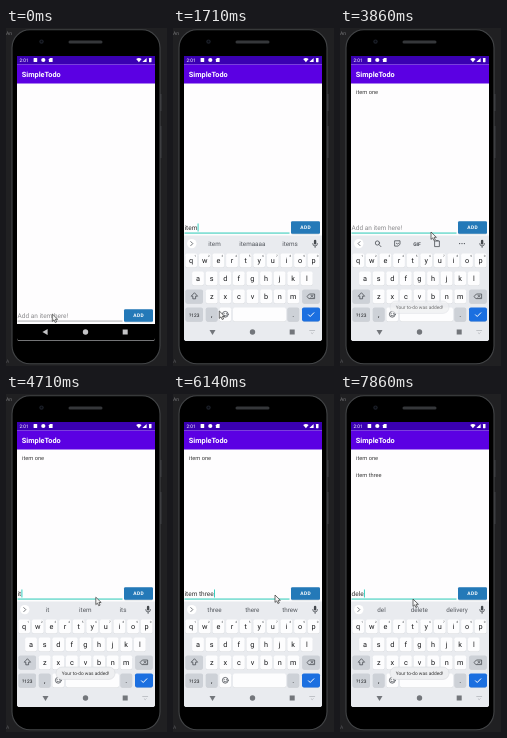
An HTML page for the animation above (8 s loop, 161 by 338 pixels).

```html
<!DOCTYPE html>
<html lang="en">
<head>
<meta charset="utf-8">
<title>To-do app demo</title>
<style>
  html, body { margin: 0; width: 100%; height: 100%; overflow: hidden; background: #202022; }
  svg { display: block; width: 100vw; height: 100vh; font-family: Roboto, "Open Sans", sans-serif; text-rendering: geometricPrecision; }
  text { white-space: pre; }
  .mid { text-anchor: middle; }
  .key { font-size: 7.3px; fill: #17181a; text-anchor: middle; }
  .num { font-size: 3px; fill: #3c4045; text-anchor: middle; }
  .word { font-size: 6.3px; fill: #55595f; text-anchor: middle; }
  .item { font-size: 5.7px; fill: #3c3c3c; }
  .line { fill: none; stroke: #4b4f55; stroke-width: .8; stroke-linecap: round; stroke-linejoin: round; }
</style>
</head>
<body>
<svg viewBox="0 0 161 338" preserveAspectRatio="none">
  <defs>
    <clipPath id="screen"><path d="M11 28h138v282q0 3-3 3h-132q-3 0-3-3z"/></clipPath>
  </defs>

  <!-- phone -->
  <rect width="161" height="338" fill="#202022"/>
  <text x="0" y="7" font-size="5" fill="#77777a">An</text>
  <text x="0" y="335" font-size="5" fill="#55555a">A</text>
  <rect x="154" y="66" width="1.6" height="17" fill="#38393c"/>
  <rect x="154" y="98" width="1.6" height="32" fill="#38393c"/>
  <rect x="6" y="1.8" width="148" height="334" rx="18" fill="#000" stroke="#424446" stroke-width="1.1"/>
  <rect x="62.5" y="12.4" width="34" height="3" rx="1.5" fill="#35373a"/>
  <circle cx="35.5" cy="13.6" r="2.2" fill="#1c2029"/>
  <circle cx="35.5" cy="13.6" r="1" fill="#05070c"/>

  <g clip-path="url(#screen)">
    <rect x="11" y="28" width="138" height="285" fill="#fefdfe"/>
    <rect x="11" y="28" width="138" height="8.5" fill="#3a00b2"/>
    <rect x="11" y="36.5" width="138" height="19" fill="#5b00e3"/>
    <g fill="#fff">
      <text x="13.5" y="33.9" font-size="4.8">2:01</text>
      <rect x="27.6" y="30" width="3.6" height="4" rx=".5"/>
      <circle cx="37.3" cy="32" r="2.1"/>
      <path d="M44 30h2.6v4h-3.7v-2.8z"/>
      <path d="M130.2 31q2.7-2 5.4 0l-2.7 3.2z"/>
      <path d="M140.6 29.9v4.2h-4.2z"/>
      <rect x="143" y="30" width="2.5" height="4.2" rx=".4"/>
      <text x="15.8" y="48.5" font-size="7.3" font-weight="600">SimpleTodo</text>
    </g>
    <text class="item" id="item1" x="16" y="66.2">item one</text>
    <text class="item" id="item2" x="16" y="83.2">item three</text>

    <g id="row">
      <text id="field" x="11.5" y="202.2" font-size="6.5"></text>
      <rect id="caret" y="195.5" width=".8" height="8" fill="#03c4b0"/>
      <rect id="underline" x="11.5" y="204.6" width="105" height=".9"/>
      <rect x="118" y="193.8" width="29" height="12.6" rx="1.3" fill="#d5dade"/>
      <rect id="add" x="118" y="193.2" width="29" height="12.6" rx="1.3"/>
      <text class="mid" x="132.7" y="201.3" font-size="4.9" font-weight="600" letter-spacing=".4" fill="#fff">ADD</text>
    </g>

    <rect id="nav" x="11" y="296" width="138" height="17"/>
    <g id="board">
      <rect x="11" y="207.5" width="138" height="106" fill="#e9ebef"/>
      <circle cx="18.8" cy="215.6" r="4.7" fill="#fff"/>
      <path class="line" id="chevron" d="M20 213.6l-2 2 2 2"/>
      <rect x="140.9" y="211.8" width="2.4" height="4.6" rx="1.2" fill="#44484d"/>
      <path class="line" d="M139.7 215.6q0 2.4 2.4 2.4t2.4-2.4M142.1 218v1.5"/>
      <g id="tools">
        <circle class="line" cx="37.4" cy="215" r="2.1"/>
        <path class="line" d="M39 216.6l2 2.1M55 212.8h5v3.3l-1.8 2h-3.2zM56.3 215.4q1.2 1.4 2.4 0M95 213h4.4v5.6h-4.4zM96.3 212.6h1.8"/>
        <text class="mid" x="77" y="217.5" font-size="5" font-weight="700" fill="#4b4f55">GIF</text>
        <g fill="#4b4f55"><circle cx="119.6" cy="215.6" r=".7"/><circle cx="122" cy="215.6" r=".7"/><circle cx="124.4" cy="215.6" r=".7"/></g>
      </g>
      <g id="words">
        <text class="word" x="41.5" y="217.7"></text>
        <text class="word" x="79.3" y="217.7"></text>
        <text class="word" x="117" y="217.7"></text>
      </g>
      <g id="keys"></g>
      <path class="line" d="M21.2 265l-3 3.2h1.6v2.6h2.8v-2.6h1.6zM134.2 268.3l2.2-2.3h5.2v4.6h-5.2zM138 267.3l2 2m0-2l-2 2"/>
      <circle class="line" cx="52.3" cy="286.3" r="2.9"/>
      <path class="line" d="M51.2 285.5v.1M53.4 285.5v.1M50.9 287.2q1.4 1.4 2.8 0"/>
      <path d="M135.2 286.5l2 2 3.9-4" fill="none" stroke="#fff" stroke-width="1"/>
      <path class="line" d="M136.7 302.5h5M138.2 304.8l1 .9 1-.9" style="stroke:#b5b8bd"/>
    </g>

    <g id="icons">
      <path id="back" d="M36.4 304l5.2-3v6z"/>
      <circle cx="79.5" cy="304" r="2.7"/>
      <rect x="116.7" y="301.5" width="5" height="5"/>
    </g>
    <g id="toast">
      <rect x="50" y="273" width="59" height="12.4" rx="6" fill="#eeeff1" stroke="#d3d5d9" stroke-width=".5"/>
      <text class="mid" x="79.5" y="280.9" font-size="4.8" fill="#333">Your to-do was added!</text>
    </g>
  </g>
  <path id="mouse" d="M0 0v7.4l1.7-1.5 1.2 2.6 1.4-.6-1.2-2.6h2.3z" fill="#f4f4f4" stroke="#333" stroke-width=".7"/>
</svg>

<script>
const $ = id => document.getElementById(id);
const set = (el, attrs) => { for (const k in attrs) el.setAttribute(k, attrs[k]); };
const STEPS = 56, RATE = 7; // screen refreshes seven times a second

function add(tag, attrs, text) {
  const el = document.createElementNS('http://www.w3.org/2000/svg', tag);
  set(el, attrs);
  if (text) el.textContent = text;
  $('keys').append(el);
}

function key(cx, row, label, w = 11.8, fill = '#fdfdfe', size = 7.3) {
  const y = 225.4 + row * 18;
  add('rect', { x: cx - w / 2, y: y + .5, width: w, height: 14, rx: 1.8, fill: '#d3d6da' });
  add('rect', { x: cx - w / 2, y, width: w, height: 14, rx: 1.8, fill });
  add('text', { class: 'key', x: cx, y: y + 9.3, style: `font-size:${size}px` }, label);
}

const GREY = '#cdd1d7';
[['qwertyuiop', 18.2], ['asdfghjkl', 25], ['zxcvbnm', 38.7]].forEach(([letters, x0], row) =>
  [...letters].forEach((c, i) => {
    const x = x0 + i * 13.6;
    key(x, row, c);
    if (!row) add('text', { class: 'num', x: x + 4, y: 229 }, String((i + 1) % 10));
  }));
key(21.2, 2, '', 17.5, GREY);
key(138, 2, '', 17.5, GREY);
key(21.2, 3, '?123', 17.5, GREY, 4.8);
key(38.7, 3, ',', 11.8, GREY);
key(52.3, 3, '');
key(86.5, 3, '', 53);
key(120.3, 3, '.', 11.8, GREY);
key(138, 3, '', 18, '#1b6fe0');

// Each list holds [step, value...] entries
const typed = [[0, ''], [9, 'i'], [10, 'it'], [11, 'ite'], [12, 'item'], [14, 'item '], [15, 'item o'],
  [16, 'item on'], [17, 'item one'], [24, ''], [32, 'i'], [33, 'it'], [34, 'ite'], [35, 'item'], [38, 'item '],
  [39, 'item t'], [40, 'item th'], [41, 'item thr'], [42, 'item thre'], [43, 'item three'], [47, ''],
  [53, 'd'], [54, 'del'], [55, 'dele']];
const hints = [[0, ''], [10, 'it item its'], [11, 'ite item items'], [12, 'item itemaaaa items'],
  [15, 'o on of'], [16, 'on one only'], [17, 'one ones once'], [26, ''], [33, 'it item its'],
  [34, 'ite item items'], [35, 'item itemaaaa items'], [39, 't to the'], [40, 'th the that'],
  [41, 'three through the'], [43, 'three there threw'], [50, ''], [54, 'del delete delivery']];
const slide = [[0, 105], [2, 105], [3, 48], [4, 0]];
const turn = [[0, 0], [2, 0], [4, 180], [5, 270]];
const first = [[0, 0], [24, 0], [25, .2], [26, 1]];
const second = [[0, 0], [47, 0], [48, .2], [49, .7], [50, 1]];
const toast = [[0, 0], [26, 0], [27, .7], [28, 1], [41, 1], [42, .4], [43, 0], [49, 0], [50, .7], [51, 1]];
const press = [[0, 0], [23, 0], [24, 1], [25, .8], [26, .3], [27, 0], [46, 0], [47, 1], [48, .8], [49, .3], [50, 0]];
const path = [[0, 46.3, 286], [2, 46.3, 286], [4, 46.3, 283], [15, 46.3, 283], [20, 130, 198], [24, 130, 198],
  [27, 91, 204], [31, 91, 204], [36, 88, 202], [42, 88, 202], [45, 130, 199], [46, 130, 199],
  [48, 91, 203], [49, 91, 203], [53, 73, 205]];

const held = (list, n) => list.filter(e => e[0] <= n).pop()[1];

function mix(list, n, col = 1) {
  const i = list.findIndex(e => e[0] > n);
  if (i < 0) return list[list.length - 1][col];
  const a = list[i - 1], b = list[i];
  return a[col] + (b[col] - a[col]) * (n - a[0]) / (b[0] - a[0]);
}

function draw(n) {
  const open = n >= 3, text = held(typed, n), hint = held(hints, n);
  set($('row'), { transform: `translate(0 ${open ? 0 : 88})` });
  set($('board'), { transform: `translate(0 ${mix(slide, n)})` });
  set($('nav'), { fill: open ? '#f1f2f4' : '#000' });
  set($('icons'), { fill: open ? '#73767b' : '#c4c4c6' });
  set($('back'), { transform: `rotate(${mix(turn, n)} 39.5 304)` });

  const field = $('field');
  field.textContent = text || 'Add an item here!';
  set(field, { fill: text ? '#333' : '#8b8b8d' });
  set($('caret'), { x: 11.8 + field.getComputedTextLength(), opacity: text ? 1 : 0 });
  set($('underline'), { fill: n < 2 ? '#a3a3a5' : '#12c3ae' });

  const p = mix(press, n), tint = (a, b) => Math.round(a + (b - a) * p);
  set($('add'), { fill: `rgb(${tint(36, 92)},${tint(121, 160)},${tint(184, 212)})` });

  set($('tools'), { opacity: hint ? 0 : 1 });
  set($('chevron'), { transform: hint ? 'rotate(180 18.9 215.6)' : '' });
  const words = hint.split(' ');
  [...$('words').children].forEach((el, i) => el.textContent = words[i] || '');

  set($('item1'), { opacity: mix(first, n) });
  set($('item2'), { opacity: mix(second, n) });
  set($('toast'), { opacity: mix(toast, n) });
  set($('mouse'), { transform: `translate(${mix(path, n)} ${mix(path, n, 2)})` });
}

let shown = -1;
function tick() {
  const n = Math.floor(performance.now() * RATE / 1000 + .03) % STEPS;
  if (n !== shown) draw(shown = n);
  requestAnimationFrame(tick);
}
tick();
</script>
</body>
</html>
```
